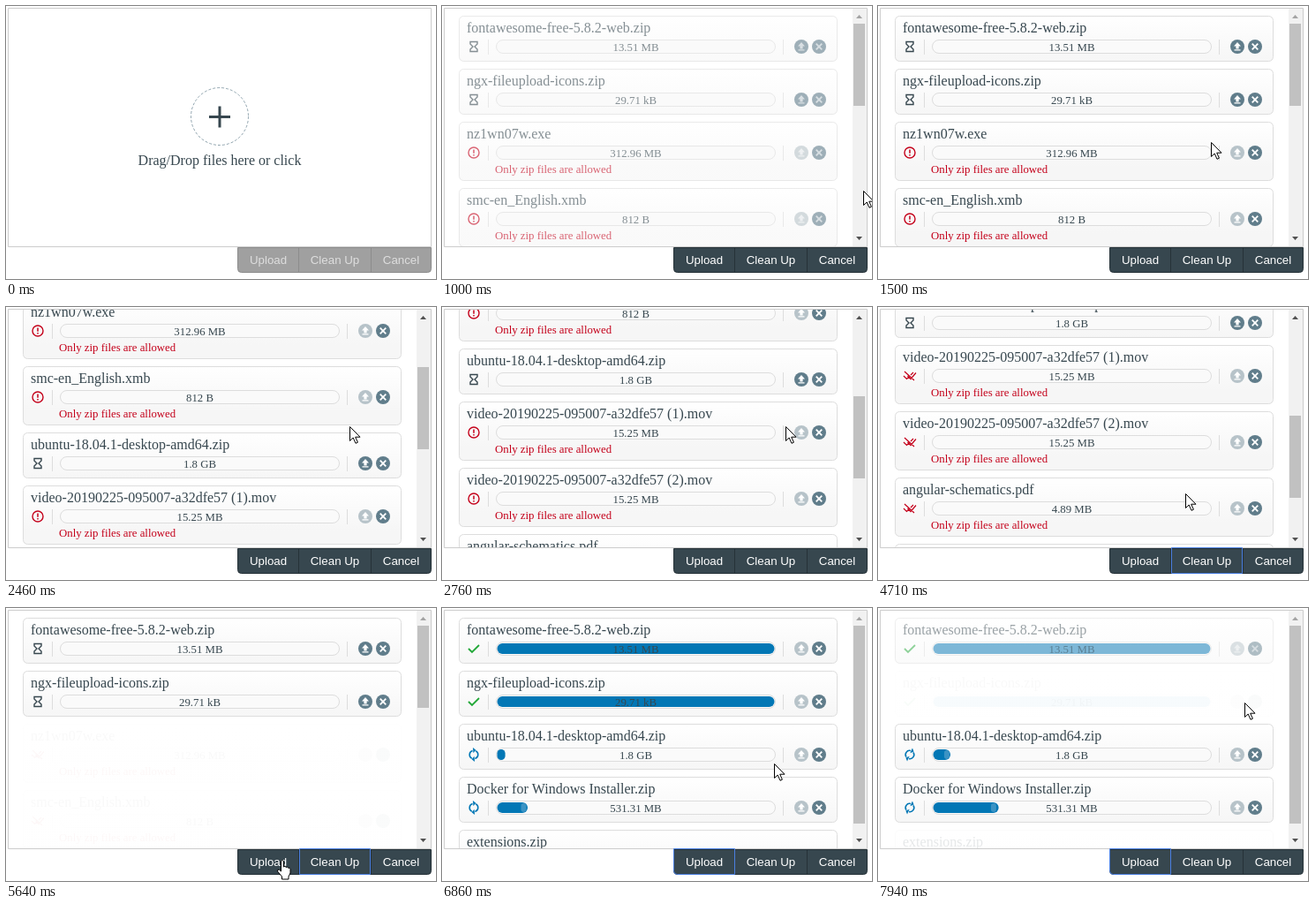
These frames come from a looping animation (487x309 px, 8000 ms). An HTML page with a canvas:

```html
<!DOCTYPE html>
<html lang="en">
<head>
<meta charset="utf-8">
<title>File upload</title>
<style>
html, body { margin: 0; width: 100%; height: 100%; overflow: hidden; background: #fff; }
canvas { display: block; }
</style>
</head>
<body>
<canvas id="stage" width="487" height="309"></canvas>
<script>
const ctx = document.getElementById('stage').getContext('2d');
const LOOP = 8000, DROP = 820, CLEAN = 3650, REMOVE = 5670, UPLOAD = 5920;
const INK = '#37474f', STEEL = '#607d8b', RED = '#c4001a', BLUE = '#0277b5';
const SERIF = '"Liberation Serif", "Times New Roman", serif';
const SANS = '"Liberation Sans", Arial, sans-serif';

// done: upload complete; leave: fade-out begins; part: progress reached at the loop end
const files = [
  { name: 'fontawesome-free-5.8.2-web.zip', size: '13.51 MB', done: 6350, leave: 7730 },
  { name: 'ngx-fileupload-icons.zip', size: '29.71 kB', done: 6050, leave: 7530 },
  { name: 'nz1wn07w.exe', size: '312.96 MB', bad: true },
  { name: 'smc-en_English.xmb', size: '812 B', bad: true },
  { name: 'ubuntu-18.04.1-desktop-amd64.zip', size: '1.8 GB', part: .064 },
  { name: 'video-20190225-095007-a32dfe57 (1).mov', size: '15.25 MB', bad: true },
  { name: 'video-20190225-095007-a32dfe57 (2).mov', size: '15.25 MB', bad: true },
  { name: 'angular-schematics.pdf', size: '4.89 MB', bad: true },
  { name: 'Docker for Windows Installer.zip', size: '531.31 MB', part: .243 },
  { name: 'extensions.zip', size: '1.2 MB', done: 6200, leave: 7570 }
];

// [time, x, y]
const cursorPath = [
  [960, 487, 215], [1200, 430, 180], [1500, 377, 154], [1600, 384, 147], [1680, 384, 147],
  [1740, 388, 139], [1880, 388, 139], [1910, 389, 135], [3040, 389, 135], [3400, 361, 285],
  [3440, 358, 285], [3720, 358, 285], [3850, 353, 245], [3910, 353, 245], [4160, 348, 211],
  [5230, 348, 211], [5600, 307, 285], [6140, 307, 285], [6500, 345, 225], [6940, 383, 165],
  [7020, 384, 163], [7790, 415, 107]
];
const scrollPath = [[2160, 0], [2460, 139], [2970, 300], [4690, 300], [4710, 299],
  [4790, 250], [4930, 70], [5010, 0]];

const clamp = v => Math.max(0, Math.min(1, v));
const ramp = (t, from, span) => clamp((t - from) / span);

function along(path, t) {
  const next = path.findIndex(p => p[0] > t);
  if (next === 0) return path[0].slice(1);
  if (next < 0) return path[path.length - 1].slice(1);
  const a = path[next - 1], b = path[next], k = (t - a[0]) / (b[0] - a[0]);
  return a.slice(1).map((v, i) => v + (b[i + 1] - v) * k);
}

function box(x, y, w, h, r, fill, stroke) {
  ctx.beginPath();
  ctx.roundRect(x, y, w, h, r);
  if (fill) { ctx.fillStyle = fill; ctx.fill(); }
  if (stroke) { ctx.strokeStyle = stroke; ctx.lineWidth = 1; ctx.stroke(); }
}

function text(str, x, y, size, color, align = 'left', family = SERIF) {
  ctx.font = `${size}px ${family}`;
  ctx.textAlign = align;
  ctx.fillStyle = color;
  ctx.fillText(str, x, y);
}

function line(d, color, width) {
  ctx.strokeStyle = color;
  ctx.lineWidth = width;
  ctx.stroke(new Path2D(d));
}

function shape(d, color) {
  ctx.fillStyle = color;
  ctx.fill(new Path2D(d));
}

function at(x, y, draw) {
  ctx.save();
  ctx.translate(x, y);
  draw();
  ctx.restore();
}

const icons = {
  error() {
    line('M6 0A6 6 0 1 1-6 0A6 6 0 1 1 6 0', RED, 1.4);
    line('M0-3.5V.8M0 2V3.5', RED, 1.5);
  },
  wait() {
    line('M-4-5.5H4V-3L1 0L4 3V5.5H-4V3L-1 0L-4-3Z', INK, 1.4);
  },
  cleared() {
    line('M-7 0L-3.5 3.5L-1 1M1-1L4-4M-2.5 0L1 3.5L7-3.5M-6-5L5 5', RED, 1.2);
  },
  check() {
    line('M-6 0L-2 4L6-4', '#22a838', 1.8);
  },
  sync(t) {
    ctx.rotate(t / 1000 * Math.PI * 2);
    for (let i = 0; i < 2; i++) {
      line('M-4.6 1A4.6 4.6 0 0 1 2.5-3.9', BLUE, 1.6);
      shape('M5.5-6V-1.5H1Z', BLUE);
      ctx.rotate(Math.PI);
    }
  }
};

function roundButton(x, y, active, glyph) {
  at(x, y, () => {
    shape('M8 0A8 8 0 1 1-8 0A8 8 0 1 1 8 0', active ? STEEL : '#b7c3c9');
    glyph();
  });
}

function row(file, y, t, uploading) {
  const finished = file.done && t >= file.done;
  const progress = !uploading ? 0 : file.done
    ? ramp(t, UPLOAD, file.done - UPLOAD)
    : file.part * (t - UPLOAD) / (LOOP - UPLOAD);
  const icon = file.bad ? (t < CLEAN ? 'error' : 'cleared')
    : finished ? 'check' : uploading ? 'sync' : 'wait';

  const shade = ctx.createLinearGradient(0, y, 0, y + 51);
  shade.addColorStop(0, '#fff');
  shade.addColorStop(1, '#f6f6f6');
  box(19.5, y + .5, 428, file.bad ? 66 : 51, 5, shade, '#ddd');
  text(file.name, 28, y + 19, 16, INK);
  at(36, y + 35, () => icons[icon](t));
  line(`M52.5 ${y + 27}v17M386.5 ${y + 27}v17`, '#ddd', 1);
  box(61.5, y + 27.5, 316, 15, 7.5, '#fafafa', '#ddd');
  if (progress > 0) {
    const w = Math.max(8, 314 * progress);
    box(62.5, y + 29, w, 12, 6, BLUE);
    if (!finished && w > 16) box(56 + w * .97, y + 30, 6, 10, 3, '#3b93c4');
  }
  text(file.size, 219.5, y + 40, 12.8, INK, 'center');
  if (file.bad) text('Only zip files are allowed', 60, y + 58, 12.8, RED);

  roundButton(407, y + 35, !file.bad && !uploading,
    () => shape('M0-5L4-.5H1.6V2.5H-1.6V-.5H-4ZM-3.5 3.3H3.5V4.6H-3.5Z', '#fff'));
  roundButton(427, y + 35, true, () => line('M-3.3-3.3L3.3 3.3M3.3-3.3L-3.3 3.3', '#fff', 1.8));
}

function list(t) {
  const [scroll] = along(scrollPath, t);
  const uploading = t >= UPLOAD;
  ctx.save();
  ctx.beginPath();
  ctx.rect(3, 3, 478, 269);
  ctx.clip();
  let y = 11 - Math.round(scroll);
  for (const file of files) {
    if (file.bad && t >= REMOVE) continue;
    const leave = file.bad ? 5230 : file.leave || Infinity;
    ctx.globalAlpha = ramp(t, DROP - 60, 400) * (1 - ramp(t, leave, 425));
    row(file, y, t, uploading);
    y += file.bad ? 75 : 60;
  }
  ctx.globalAlpha = 1;
  scrollbar(scroll, t >= REMOVE ? 224 : 93);
  ctx.restore();
}

function scrollbar(scroll, height) {
  box(465, 3, 16, 269, 0, '#f1f1f1');
  box(466, 20 + Math.round(scroll * .344), 13, height, 0, '#c1c1c1');
  shape('M469 14H476L472.5 10Z', scroll > 0 ? '#505050' : '#a3a3a3');
  shape('M469 261H476L472.5 265Z', '#505050');
}

function dropZone() {
  ctx.setLineDash([3, 2]);
  at(242, 125, () => line('M32.5 0A32.5 32.5 0 1 1-32.5 0A32.5 32.5 0 1 1 32.5 0', '#90a4ae', 1));
  ctx.setLineDash([]);
  line('M230 125.5H254M242 113.5V137.5', INK, 3);
  text('Drag/Drop files here or click', 242, 180, 16, INK, 'center');
}

function toolbar(t) {
  const enabled = t >= DROP;
  const edge = enabled ? '#263238' : '#8c8c8c';
  box(262.5, 273.5, 219, 28, [0, 0, 4, 4], enabled ? INK : '#a0a0a0', edge);
  line('M331.5 273V302M413.5 273V302', edge, 1);
  [['Upload', 297], ['Clean Up', 372.5], ['Cancel', 447.5]].forEach(([label, x]) =>
    text(label, x, 292, 13.333, enabled ? '#fff' : '#dedede', 'center', SANS));
  if (t >= UPLOAD) box(262.5, 272.5, 69, 29, [0, 0, 0, 4], null, '#4a7fe0');
  else if (t >= CLEAN) box(332.5, 272.5, 80, 29, 0, null, '#4a7fe0');
}

function cursor(t) {
  if (t < 960) return;
  const [x, y] = along(cursorPath, t);
  const d = y > 272
    ? 'M4.5 1.5Q6-.5 7.5 1.5V8Q9 6.5 10.3 8.5Q11.8 7.5 12.8 9.3Q14.5 8.5 15 10.5V15L13 19V22H5.5V19L.5 13Q0 10.5 2.5 11.3L4.5 13Z'
    : 'M.5.5V16.5L4.2 13L7 19.3L9.4 18.2L6.7 12.2H12Z';
  at(Math.round(x), Math.round(y), () => {
    shape(d, '#fff');
    line(d, '#000', 1);
  });
}

function draw(t) {
  ctx.fillStyle = '#fff';
  ctx.fillRect(0, 0, 487, 309);
  box(2.5, 2.5, 479, 270, 0, '#fff', '#ccc');
  if (t < DROP) dropZone();
  else list(t);
  toolbar(t);
  cursor(t);
}

function tick() {
  draw(performance.now() % LOOP);
  requestAnimationFrame(tick);
}
tick();
</script>
</body>
</html>
```
